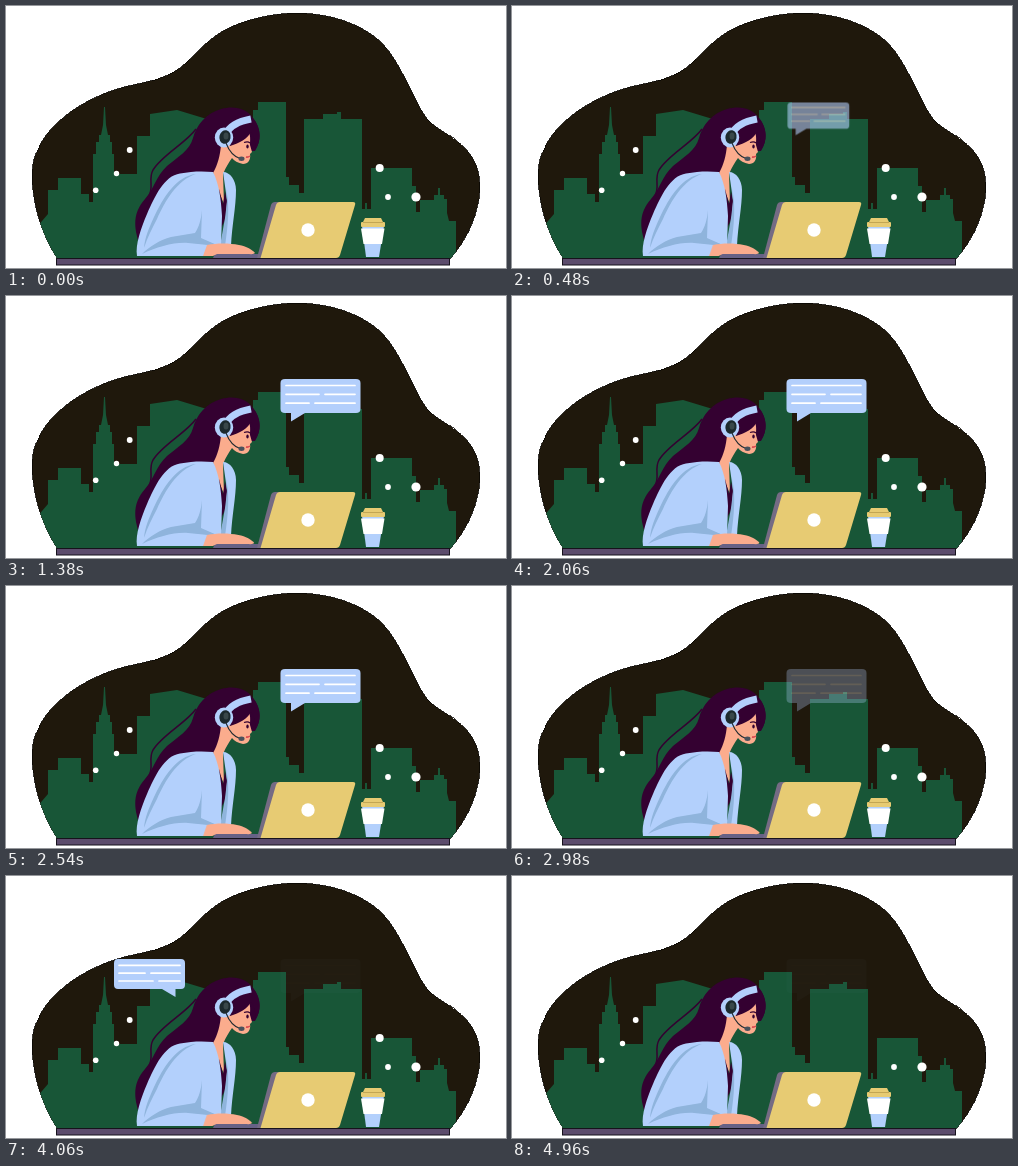
An HTML page for the animation above (5 s loop, 500 by 262 pixels).

```html
<!DOCTYPE html>
<html lang="en">
<head>
<meta charset="utf-8">
<title>Support agent</title>
<style>
  html, body { margin: 0; width: 100%; height: 100%; overflow: hidden; background: #fff; }
  svg { display: block; width: 100vw; height: 100vh; }
  .bubble { opacity: 0; fill: #b3cffc; }
  .bubble path + path { fill: none; stroke: #fff; stroke-width: 1.7; stroke-linecap: round; }
  #rightBubble { transform-origin: 279px 142px; }
  #leftBubble { transform-origin: 161px 118px; }
  #hand { transform-origin: 199px 248px; }
</style>
</head>
<body>
<svg viewBox="0 0 500 262">
  <defs>
    <path id="blob" d="M51 252C38 232 26 202 26 166C27 130 66 95 118 81C139 76 157 74 174 62C190 49 198 36 217 25C236 14 266 7 293 7C326 8 356 18 376 37C396 58 407 94 421 113C434 127 453 131 466 151C474 163 475 180 473 193C469 217 459 235 445 252Z"/>
    <clipPath id="inside"><use href="#blob"/></clipPath>
  </defs>

  <use href="#blob" fill="#1f180c" stroke="#080603" stroke-width=".8" shape-rendering="crispEdges"/>
  <path id="skyline" clip-path="url(#inside)" fill="#185637" d="M30 252V222L42 208V184H52V172H75V188H83V196H87V148H90V136H93V129H95L97 119L98 101H99L100 119L102 129H104V136H106V148H108V168H131V130H144V108L171 104L204 114L247 120V104H252V96H280V171H283V179H293V187H298V113H317V108H331V106H335V113H356V203H359V197H361V203H365V162H406V180H410V206H414V194H428V189H432V182H434V189H438V193H441V207L443 215H450V252Z"/>

  <g fill="#fff">
    <circle cx="123.700" cy="144" r="2.900"/>
    <circle cx="110.500" cy="167.500" r="2.700"/>
    <circle cx="89.700" cy="184.300" r="2.800"/>
    <circle id="blinkDot" cx="373.700" cy="162" r="4"/>
    <circle cx="382" cy="191" r="2.900"/>
    <circle cx="410" cy="191" r="4.600"/>
  </g>

  <g id="rightBubble" class="bubble">
    <path d="M279 83H350Q354.500 83 354.500 87V113Q354.500 117 350 117H299L285 125.500V117H279Q274.500 117 274.500 113V87Q274.500 83 279 83Z"/>
    <path d="M280 89.500H349M280 98.300H313M319 98.300H349M280 107.200H303M309 107.200H349"/>
  </g>
  <g id="leftBubble" class="bubble">
    <path d="M112 83H175Q179 83 179 87V109Q179 113 175 113H169.500V121L156 113H112Q108 113 108 109V87Q108 83 112 83Z"/>
    <path d="M113 89.300H174M113 97.200H139M145 97.200H174M113 105H147M153 105H174"/>
  </g>

  <g id="woman">
    <path fill="#340131" d="M247 112C241 103 229 99 215 103C200 107 190 120 187 132C184 144 172 151 161 160C150 170 148 183 139 193C130 203 127 215 131 230C132 236 135 240 138 242L190 195L214 165L229 145L249 145C255 135 256 124 247 112Z"/>
    <path fill="none" stroke="#340131" stroke-width="1.500" d="M190 123C180 137 156 149 147 164C142 173 148 180 143 190"/>
    <path fill="#fbac8d" d="M215 139L226 128L242 123C245 129 244 135 244 139L246 146L244 148C245 154 242 158 237 158C232 157 228 155 226 152C223 156 220 161 217 168L218 198L213 186L207 167C212 158 214 150 215 139Z"/>
    <path fill="#340131" d="M221 128C226 119 237 113 247 112C255 121 256 135 249 144C250 137 248 130 245 126C241 133 234 137 224 140Z"/>
    <path fill="none" stroke="#340131" stroke-width="1.200" d="M238 136.500Q242 135 244 137"/>
    <ellipse cx="241.500" cy="140.500" rx="1.200" ry="1.900" fill="#340131"/>
    <path fill="none" stroke="#d8434d" stroke-width="1.500" d="M240 151Q242 151.500 244 150"/>
    <path fill="#340131" d="M213 183L217 198L219 186L222 198L219 214L215 222Z"/>

    <path id="rightPanel" fill="#b3d0fc" d="M217 166C224 166 230 174 230 184C230 201 226 219 225 240H215L220 210L221 194Z"/>
    <path fill="#8fb4dc" d="M220 183C224 199 222 220 219 240H214L219 212L221 196Z"/>
    <path id="sleeve" fill="#b3d0fc" d="M207 166C213 178 215 192 216 210L215 240L199 250H131C129 239 135 222 141 208C149 190 158 170 174 167.500C186 165 198 165 207 166Z"/>
    <path fill="#8fb4dc" d="M190 168C170 170 157 192 148 211C143 222 139 231 138 242C141 232 146 223 151 213C159 195 171 174 190 168Z"/>
    <path fill="#8fb4dc" d="M196 204C195 214 193 221 189 227L165 231C154 234 144 240 136 248C151 241 168 236 182 237L202 239L211 239L195 232Z"/>

    <path fill="none" stroke="#b3d0fc" stroke-width="7" d="M220 128C224 119 234 115 245 113"/>
    <ellipse cx="218" cy="131.500" rx="9.200" ry="10" fill="#b3d0fc"/>
    <ellipse cx="219" cy="131" rx="5.600" ry="6.800" fill="#1c2a2e" transform="rotate(12 219 131)"/>
    <ellipse cx="220" cy="130" rx="2.500" ry="3.500" fill="#39484a"/>
    <path fill="none" stroke="#202a30" stroke-width="1.100" d="M220 137C223 145 228 151 235 153"/>
    <ellipse cx="235.500" cy="152.800" rx="3" ry="2.200" fill="#48515c"/>
  </g>

  <path fill="#676186" d="M209 248H256V252H207Z"/>
  <path id="hand" fill="#fbac8d" d="M201 239C211 237 223 237 233 239C240 240 247 244 249 247Q248 248.500 243 248H211L207 250H197Z"/>

  <path fill="#756b84" d="M269 196H275L257 252H251L265 199Q266 196 269 196Z"/>
  <path fill="#e7cb73" d="M274 196H347Q350 196 349 199L334 249Q333 252 330 252H254.500L270 199Q271 196 274 196Z"/>
  <circle cx="302" cy="224" r="6.700" fill="#fff"/>

  <g id="cup">
    <path fill="#b3d0fc" d="M356 220H378L373 251H360Z"/>
    <path fill="#fff" d="M355 222.500H378.500L376 238H357.500Z"/>
    <path fill="#e7cb73" d="M359 212H375L377 216H378Q379 216 379 217V220Q379 221 378 221H356Q355 221 355 220V217Q355 216 356 216H357Z"/>
    <path stroke="#b99d4f" stroke-width=".8" d="M357 216.500H377"/>
  </g>

  <rect x="50.500" y="252.500" width="393" height="6.500" fill="#5c4c6c" stroke="#17121c"/>
</svg>
<script>
  const LOOP = 5000;

  // Each step is [time in ms, properties].
  function play(id, steps) {
    const frames = steps.map(([time, props]) => ({ offset: time / LOOP, ...props }));
    const animation = document.getElementById(id).animate(frames, { duration: LOOP, iterations: Infinity });
    animation.startTime = document.timeline.currentTime;
  }

  const pose = (opacity, scale) => ({ opacity, transform: `scale(${scale})` });
  const gone = pose(0, 0.54);
  const growing = pose(0.9, 0.89);
  const shown = pose(1, 1);
  const trace = pose(0.02, 1);

  play('rightBubble', [
    [0, gone], [200, gone], [625, growing], [760, shown], [2740, shown],
    [3080, trace], [4999, trace], [LOOP, gone]
  ]);
  play('leftBubble', [
    [0, gone], [3000, gone], [3400, growing], [3520, shown], [4440, shown],
    [4760, pose(0, 1)], [LOOP, pose(0, 1)]
  ]);
  play('blinkDot', [
    [0, { opacity: 1, easing: 'step-end' }],
    [4960, { opacity: 0, easing: 'step-end' }],
    [LOOP, { opacity: 0 }]
  ]);
  play('hand', Array.from({ length: 7 }, (_, i) => [
    i * LOOP / 6,
    { transform: i % 2 ? 'scaleX(.94)' : 'none', easing: 'ease-in-out' }
  ]));
</script>
</body>
</html>
```
